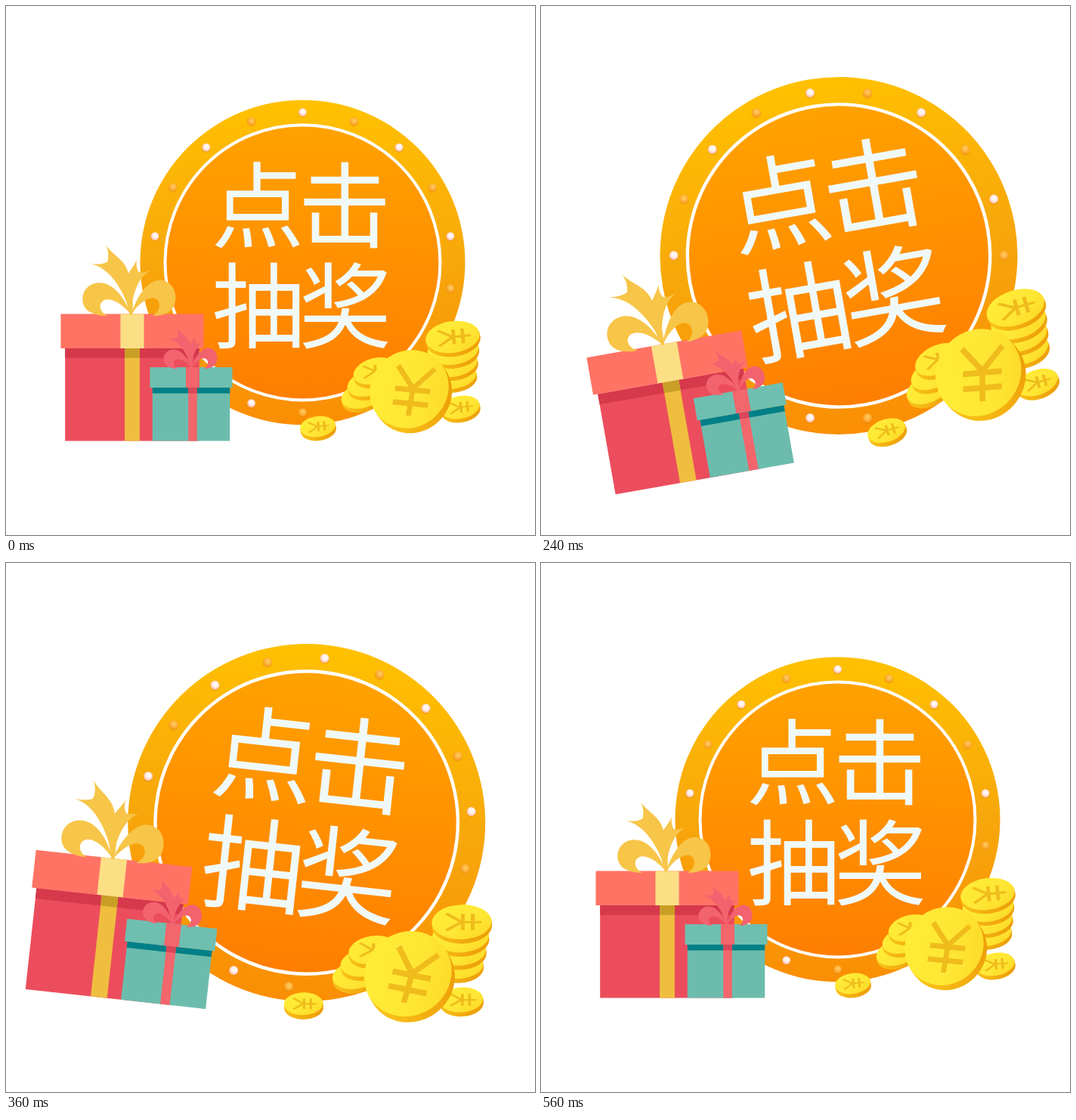
Recreate the animation shown at these times as an HTML page. Size 700x700 px, loop 3000 ms.

```html
<!DOCTYPE html>
<html lang="zh">
<head>
<meta charset="utf-8">
<style>
  html, body { margin: 0; width: 100%; height: 100%; overflow: hidden; background: #fff; }
  svg { display: block; width: 100vw; height: 100vh; }
  text { font: 400 123px "Noto Sans CJK SC", "Noto Sans CJK", sans-serif; text-anchor: middle; fill: #f0f9f8; }
</style>
</head>
<body>
<svg viewBox="0 0 700 700">
  <defs>
    <linearGradient id="ring" x2="0" y2="1">
      <stop offset="0" stop-color="#ffc100"/>
      <stop offset=".5" stop-color="#f7a70b"/>
      <stop offset="1" stop-color="#fa8e04"/>
    </linearGradient>
    <linearGradient id="plate" x2="0" y2="1">
      <stop offset="0" stop-color="#ffa200"/>
      <stop offset="1" stop-color="#ff7e00"/>
    </linearGradient>
    <radialGradient id="pearl" cx=".55" cy=".4" r=".6">
      <stop offset=".4" stop-color="#fff6f4"/>
      <stop offset="1" stop-color="#ffb9a4"/>
    </radialGradient>
    <radialGradient id="amber" cx=".55" cy=".4" r=".6">
      <stop offset=".2" stop-color="#ffc657"/>
      <stop offset="1" stop-color="#fa9a20"/>
    </radialGradient>
    <linearGradient id="face" x2="1" y2="1">
      <stop offset="0" stop-color="#ffee38"/>
      <stop offset=".6" stop-color="#ffe634"/>
      <stop offset="1" stop-color="#fcd523"/>
    </linearGradient>
    <linearGradient id="edge" x2="1" y2=".3">
      <stop offset="0" stop-color="#fbc91d"/>
      <stop offset="1" stop-color="#eea009"/>
    </linearGradient>
    <path id="loop" fill-rule="evenodd" d="M0 0C-8-22-24-44-44-42C-62-40-68-22-61-10C-55 0-38 2-30 1ZM0 0C-10-13-26-24-36-19C-44-14-41-3-31 1Z"/>
    <path id="tail" d="M0 0C-8-28-26-62-53-67C-43-66-35-67-31-70C-29-78-30-86-34-92C-22-77-10-73-5-59C2-40 3-18 2 0Z"/>
    <!-- knot of the bow at 0,0 -->
    <g id="bow">
      <use href="#loop"/>
      <use href="#loop" transform="scale(-.92 1.08)"/>
      <use href="#tail"/>
      <use href="#tail" transform="rotate(-14) scale(-.75 .75)"/>
    </g>
    <path id="yen" d="M-25-28L0 0L25-28M0 0V36M-24 2H24M-24 20H24" fill="none"/>
  </defs>

  <g id="scene">
    <circle cx="392.5" cy="339.4" r="215" fill="url(#ring)"/>
    <circle cx="392.5" cy="339.4" r="182" fill="url(#plate)" stroke="#fff" stroke-width="4"/>
    <g id="dots"></g>
    <text x="333 448" y="310">点击</text>
    <text x="334 449" y="443">抽奖</text>
    <g id="gifts"></g>
    <g id="coins"></g>
  </g>
</svg>
<script>
const byId = id => document.getElementById(id);
const rect = (x, y, w, h, fill) => `<rect x="${x}" y="${y}" width="${w}" height="${h}" fill="${fill}"/>`;

let dots = '';
for (let i = 0; i < 18; i++) {
  const a = i * Math.PI / 9;
  const x = 392.5 + 198.5 * Math.sin(a), y = 339.2 - 198.5 * Math.cos(a);
  dots += `<circle cx="${x}" cy="${y + 1}" r="6" fill="#d9820c" opacity=".3"/>
    <circle cx="${x}" cy="${y}" r="5.4" fill="url(#${i % 2 ? 'amber' : 'pearl'})"/>`;
}
byId('dots').innerHTML = dots;

// Colours come as lid, shade, body; everything else follows from the lid's size.
function gift(x, y, w, lid, bottom, knot, box, ribbon, bow) {
  const inset = w * .03, shade = lid * .28, band = w * .165;
  const bands = (left, width, [top, dark, body]) =>
    rect(left + inset, y + lid, width - 2 * inset, bottom - y - lid, body) +
    rect(left + inset, y + lid, width - 2 * inset, shade, dark) +
    rect(left, y, width, lid, top);
  const ribbonBands = bands(0, band, ribbon);
  return bands(x, w, box) +
    `<g transform="translate(${knot - band / 2 + 1.5})">${ribbonBands}</g>` +
    `<use href="#bow" transform="translate(${knot} ${y + 1}) scale(${w / 188})" fill="${bow}"/>`;
}

byId('gifts').innerHTML =
  gift(72.5, 407.5, 189, 45.5, 575.5, 165.5,
    ['#ff7365', '#d6384c', '#ec4d5c'], ['#fbdf85', '#c99f26', '#efbe3f'], '#f7c548') +
  gift(190.5, 478, 109, 27, 575.5, 245.5,
    ['#6fbfb0', '#007f87', '#6cbcad'], ['#f2666c', '#d8475a', '#f2666c'], '#f2636f');

// A tilted face over a short pile of edge slices; sign is an optional yen transform.
function coin(x, y, rx, ry, tilt, sign, dx = 1, dy = 5) {
  const disc = (k, fill) =>
    `<ellipse rx="${rx}" ry="${ry}" transform="translate(${x + dx * k} ${y + dy * k}) rotate(${tilt})" fill="url(#${fill})"/>`;
  let out = '';
  for (let k = 4; k > 0; k--) out += disc(k / 4, 'edge');
  out += disc(0, 'face');
  if (sign) out += `<use href="#yen" stroke="#efbc1c" stroke-width="7" transform="translate(${x} ${y}) ${sign}"/>`;
  return out;
}

const lying = rx => `rotate(-6) scale(${rx / 54} ${rx / 88}) rotate(-90)`;

function stack(count, x, y, rx, tilt, dx, dy, shrink) {
  let out = '';
  for (let i = count - 1; i >= 0; i--) {
    const r = rx - shrink * i;
    out += coin(x + dx * i, y + dy * i, r, r * .58, tilt, i ? '' : lying(rx));
  }
  return out;
}

byId('coins').innerHTML =
  stack(4, 591, 438, 36, -8, .5, 17, 2) +
  stack(1, 601, 531, 26, -10, 0, 0, 0) +
  stack(3, 488, 483, 29, -16, -8, 16, 0) +
  coin(533.5, 507, 54, 50, -42, 'translate(5 -1) matrix(.97 .09 -.17 1 0 0)', 4.5, 6.5) +
  stack(1, 412.5, 556.5, 23.5, -8, 0, 0, 0);

const LOOP = 3000, STEP = 40, END = 560, MID = END / 2, RAMP = 320 / 3;
const clamp = v => Math.max(0, Math.min(1, v));

// Grow, swing once each way, shrink: mirrored around MID.
function pose(t) {
  const fromMid = Math.abs(t - MID);
  const grow = clamp((MID - fromMid) / RAMP);
  const swing = clamp(Math.min(fromMid / STEP, (STEP + RAMP - fromMid) / RAMP));
  return { scale: 1 + .1 * grow, angle: 10 * swing * Math.sign(t - MID) };
}

const scene = byId('scene');
const start = performance.now();

function draw() {
  const t = Math.floor((performance.now() - start) % LOOP / STEP) * STEP;
  const { scale, angle } = pose(t);
  scene.setAttribute('transform',
    `translate(350 350) rotate(${angle}) scale(${scale}) translate(-350 -350)`);
  requestAnimationFrame(draw);
}
draw();
</script>
</body>
</html>
```
